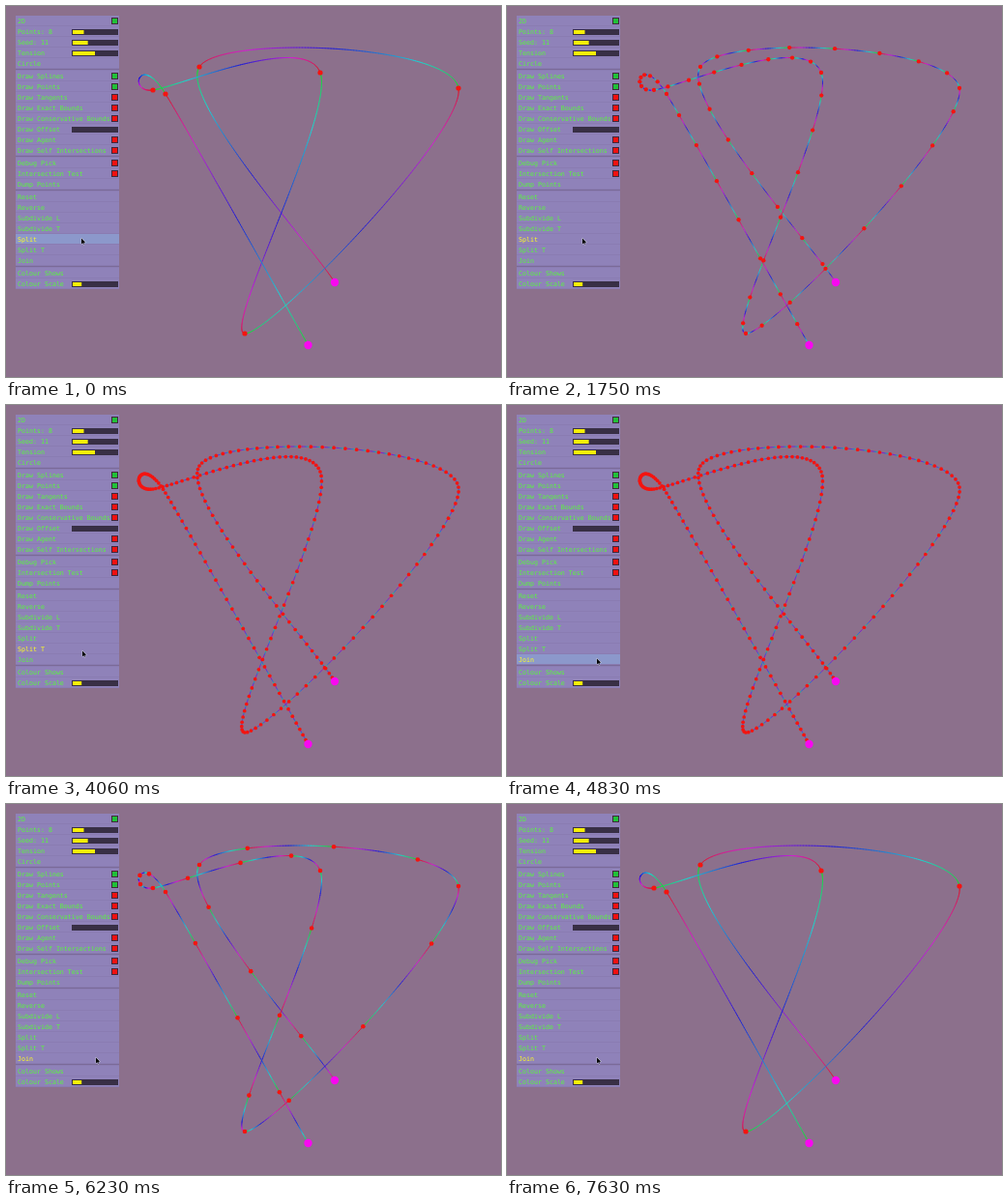
Recreate the animation shown at these times as an HTML page with a canvas. Size 512 by 384 pixels, loop 8 s.

```html
<!DOCTYPE html>
<html>
<head>
<meta charset="utf-8">
<title>Spline splitting</title>
<style>
html, body { margin: 0; width: 100%; height: 100%; overflow: hidden; background: #8c708c; }
canvas { display: block; }
</style>
</head>
<body>
<canvas id="stage" width="512" height="384"></canvas>
<script>
const ctx = document.getElementById('stage').getContext('2d');
const LOOP = 8000, TICK = 70, HOLD = 175;

const knots = [[340, 286], [200, 63], [468, 85], [247, 339], [325, 69], [152, 87], [165, 91], [312.5, 351]];
const segments = knots.length - 1;

// Labels by group: '+' and '-' mark checkboxes, '=n' a slider filled to n percent.
const menu = [
  '+2D|Points: 8=25|Seed: 11=34|Tension=50|Circle',
  '+Draw Splines|+Draw Points|-Draw Tangents|-Draw Exact Bounds|-Draw Conservative Bounds|' +
    'Draw Offset=0|-Draw Agent|-Draw Self Intersections',
  '-Debug Pick|-Intersection Test|Dump Points',
  'Reset|Reverse|Subdivide L|Subdivide T|Split|Split T|Join',
  'Colour Shows|Colour Scale=20'
].map(group => group.split('|'));

// Button releases: evenly paced splits, then joins.
const splits = [0, 1, 2, 3, 4].map(i => 70 + 735 * i);
const joins = [4970, 5320, 6020, 6580, 7140];
const releases = [...splits, ...joins];

// Catmull-Rom spline through the knots
function tangent(i) {
  const a = knots[Math.max(0, i - 1)], b = knots[Math.min(segments, i + 1)];
  return [(b[0] - a[0]) / 6, (b[1] - a[1]) / 6];
}

function curve(i, t) {
  const p = knots[i], q = knots[i + 1], m = tangent(i), n = tangent(i + 1), s = 1 - t;
  return [0, 1].map(k => s * s * s * p[k] + 3 * s * s * t * (p[k] + m[k]) +
    3 * s * t * t * (q[k] - n[k]) + t * t * t * q[k]);
}

function dot([x, y], r, fill) {
  ctx.beginPath();
  ctx.arc(x, y, r, 0, 7);
  ctx.fillStyle = fill;
  ctx.fill();
}

function drawSpline(level) {
  const pieces = 2 ** level, steps = 128;
  ctx.lineWidth = .85;
  ctx.lineCap = 'round';
  for (let i = 0; i < segments; i++)
    for (let j = 0; j < steps; j++) {
      const u = (j + .5) / steps * pieces % 1;
      ctx.strokeStyle = `hsl(${360 - 240 * u} 80% 47%)`;
      ctx.beginPath();
      ctx.moveTo(...curve(i, j / steps));
      ctx.lineTo(...curve(i, (j + 1) / steps));
      ctx.stroke();
    }
  for (let i = 1; i < segments * pieces; i++)
    dot(curve(Math.floor(i / pieces), i / pieces % 1), 2.6 - level * .15, '#f41410');
  dot(knots[0], 4.2, '#f808f0');
  dot(knots[segments], 4.2, '#f808f0');
}

function box(x, y, w, h, fill) {
  ctx.fillStyle = fill;
  ctx.fillRect(x, y, w, h);
}

function drawRow(item, y, active, pressed) {
  const [, mark, label, fill] = item.match(/^([+-]?)([^=]+)=?(\d*)$/);
  box(10, y, 107, 10, active && pressed ? '#8c98cb' : '#8f82b9');
  ctx.fillStyle = active ? '#ffff20' : '#58f83c';
  ctx.fillText(label, 12, y + 7.7);
  if (mark) {
    box(109, y + 2, 7, 7, '#40283c');
    box(110, y + 3, 5, 5, mark === '+' ? '#20c038' : '#f01010');
  } else if (fill) {
    box(68, y + 3, 48, 6, '#382f45');
    box(69, y + 4, 46 * fill / 100, 4, '#f8f008');
  }
}

function drawMenu(mouseY, pressed) {
  box(10, 10, 107, 283, '#8a7cb2');
  ctx.font = '6.64px "DejaVu Sans Mono", monospace';
  let y = 10;
  for (const group of menu) {
    if (y > 10) {
      box(10, y, 107, 1, '#7a6a98');
      y += 2;
    }
    for (const item of group) {
      drawRow(item, y, mouseY >= y && mouseY < y + 11, pressed);
      y += 11;
    }
  }
}

// The pointer sinks steadily and swings right at the end.
function mouseAt(t) {
  const u = Math.min(1, Math.max(0, (t - 3570) / 770));
  return [78 + 15 * u ** 6, 240.5 + 22 * u];
}

function drawCursor([x, y]) {
  ctx.beginPath();
  ctx.moveTo(x, y);
  ctx.lineTo(x, y + 5.8);
  ctx.lineTo(x + 1.5, y + 4.8);
  ctx.lineTo(x + 2.6, y + 7);
  ctx.lineTo(x + 2.6, y + 4.4);
  ctx.lineTo(x + 4, y + 4);
  ctx.closePath();
  ctx.lineWidth = .8;
  ctx.strokeStyle = '#c8c8dc';
  ctx.stroke();
  ctx.fillStyle = '#080808';
  ctx.fill();
}

function draw(t) {
  const count = list => list.filter(up => t >= up).length;
  const level = count(splits) - count(joins);
  const pressed = releases.some(up => t >= up - HOLD && t < up);
  const mouse = mouseAt(t);
  box(0, 0, 512, 384, '#8c708c');
  drawSpline(level);
  drawMenu(mouse[1], pressed);
  drawCursor(mouse);
}

const start = performance.now();
function frame() {
  const t = (performance.now() - start) % LOOP;
  draw(Math.floor(t / TICK) * TICK);
  requestAnimationFrame(frame);
}
frame();
</script>
</body>
</html>
```
